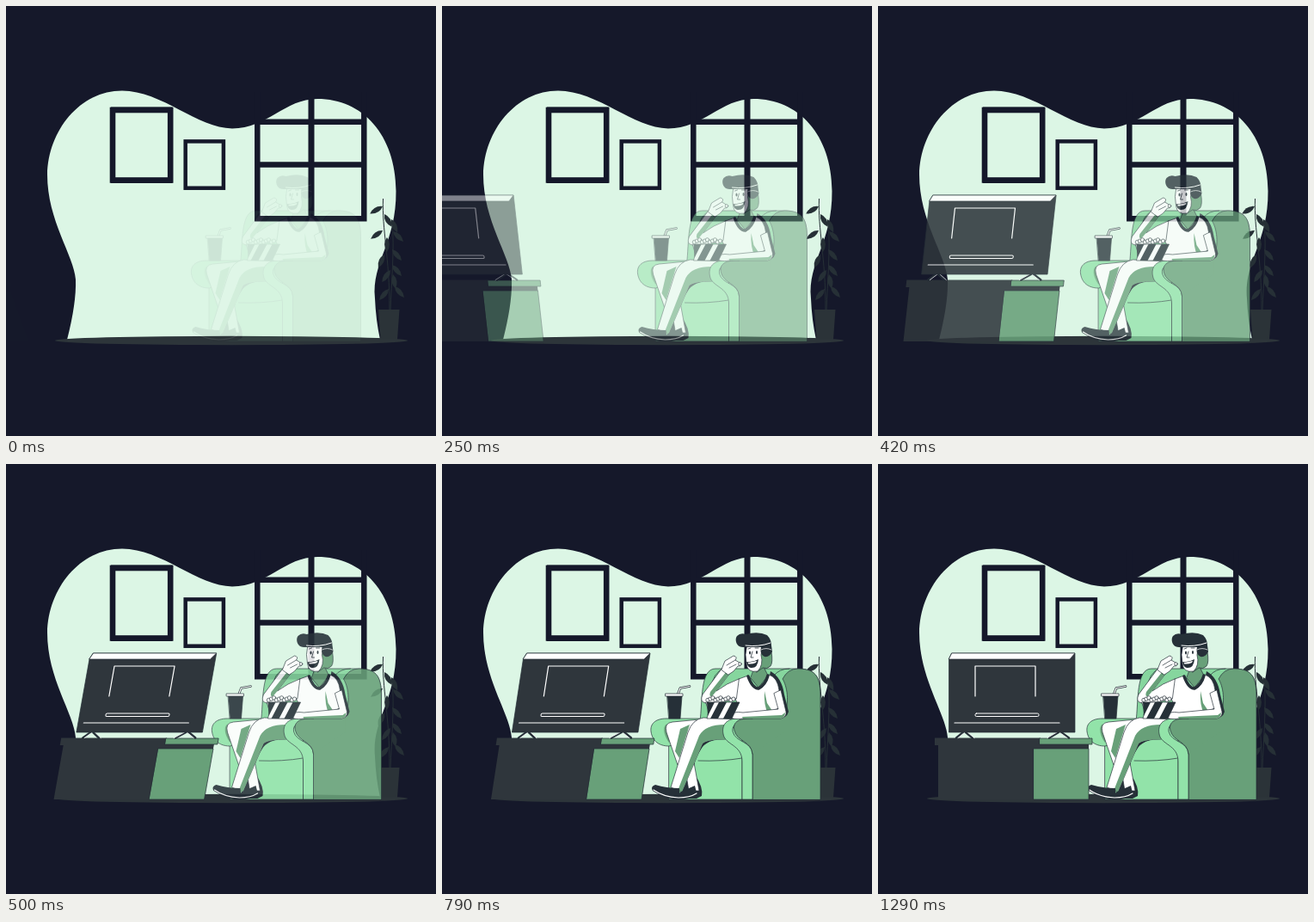
Write an HTML page that moves like this. It is 500 px wide and 500 px high and loops after 1330 ms.

```html
<!DOCTYPE html>
<html lang="en">
<head>
<meta charset="utf-8">
<title>Evening at home</title>
<style>
  html, body { margin: 0; width: 100%; height: 100%; overflow: hidden; background: #15182a; }
  svg { display: block; width: 100vw; height: 100vh; }
  .wall { fill: #dcf6e5; }
  .bars { fill: none; stroke: #15182a; }
  .ink { fill: #263038; }
  .light { fill: #92e3a9; }
  .mid { fill: #86d69e; }
  .deep { fill: #68a079; }
  .white { fill: #fff; }
  .line { fill: none; stroke: #263038; }
  .glow { fill: none; stroke: #fff; }
  #sitter, #tv { stroke-linejoin: round; stroke-linecap: round; }
  .outlined { stroke: #263038; stroke-width: .7; }
</style>
</head>
<body>
<svg viewBox="0 0 500 500">
  <path class="wall" d="M71 388Q82 345 81 318C79 290 48 250 48 196C49 145 86 98.600 135 98.600C181 98.600 223 142.400 263 142.400C304 142.400 324 108 362 108C415 108 453 150 453.500 215C454 276 425 297 429 340Q430 365 435 388Z"/>
  <g class="bars">
    <path stroke-width="6.5" d="M292.3 100V247.3H416.3V100M292 134.8H416M292 184.5H416"/>
    <path stroke-width="7" d="M355 100V247"/>
    <rect x="124" y="121" width="67.2" height="81.5" stroke-width="6.6"/>
    <path stroke-width="1.2" d="M122 118H193.5M122 205.5H193.5"/>
    <rect x="208.7" y="157.4" width="44.2" height="54.3" stroke-width="4.5"/>
  </g>
  <ellipse cx="262" cy="389" rx="205" ry="5.2" fill="#2d353a"/>
  <g fill="#263036">
    <path fill="none" stroke="#263036" d="M438.5 224C437 260 446 290 446 354M449 249C452 285 448 320 447 354"/>
    <g id="leaves"></g>
    <path fill="#2b3338" d="M433 353H457.5L455 388H435.5Z"/>
  </g>

  <g id="sitter">
    <!-- armchair -->
    <g class="outlined">
      <path class="mid" d="M300 300C303 275 300 238 318 238H412C437 238 440 250 440 272V390H300Z"/>
      <path class="deep" d="M361 390V330L397 296C405 276 401 258 396 250Q402 238 414 238C437 238 440 250 440 272V390Z"/>
      <path class="line" d="M312 264Q315 241 328 238M386 246Q392 238 404 238"/>
      <path class="light" d="M264 300H349V390H264Z"/>
      <path class="light" d="M300 296H261C247 296 242 303 243 311C245 325 256 328 264 328L300 318Z"/>
      <path class="deep" d="M263 302C256 303 257 314 264 324L270 304Z" stroke="none"/>
      <path class="line" d="M298 345Q325 346 349 342"/>
    </g>
    <path class="ink" d="M331 318Q306 321 301 332Q290 348 294 361Q304 376 302 386L296 389H276L284 345L303 318Z"/>

    <!-- drink -->
    <g class="outlined">
      <path class="line" stroke-width="2.6" d="M274.5 267L277 260.5L288 258.5"/>
      <path class="glow" stroke-width="1.2" d="M274.5 267L277 260.5L288 258.5"/>
      <path class="ink" d="M262 270H279L277 296H264Z"/>
      <path class="white" d="M260 267H280V270H260Z"/>
    </g>

    <!-- torso -->
    <path class="ink" d="M382 241Q395 248 398 268L403 288Q401 296 390 296L376 270Z"/>
    <g class="outlined">
      <path class="deep" d="M363 238L374 236L379 246L368 260L359 249Z"/>
      <path class="white" d="M345 250L356 246Q361 261 369 262Q377 257 380 245Q390 248 392 263L394 283L382 288L381 296H338L343 277L336 264Z"/>
      <path class="deep" stroke="none" d="M375 264Q374 281 379 290H386L378 278Z"/>
    </g>
    <path class="line" stroke-width="3.5" d="M356 247Q361 261 368 261Q376 257 379 246"/>

    <!-- raised arm -->
    <g class="outlined">
      <path class="white" d="M345 250Q331 255 319 264L335 243L326 237L303 268Q299 277 307 278Q326 278 342 273Z"/>
      <path class="deep" stroke="none" d="M319 264L335 243L331 241L312 265Q310 271 314 270Z"/>
      <path class="white" d="M325 239L329 229L339 223Q344 224 341 228L346 231Q350 235 344 235L339 241L333 245Z"/>
      <path class="line" d="M331 234L341 228M334 237L342 233"/>
    </g>

    <!-- legs -->
    <g class="outlined">
      <path class="white" d="M300 297L268 300Q258 301 261 312L274 350H282L287 380H299L292 342L302 310Z"/>
      <path class="deep" stroke="none" d="M277 308L288 303L276 342L271 334Z"/>
      <path class="white" d="M344 297L304 295Q291 297 286 312L266 376L279 381L303 325Q309 320 329 320Z"/>
      <path class="deep" stroke="none" d="M329 303Q306 303 299 316L274 380L279 381L303 325Q309 320 331 320Z"/>
    </g>
    <path class="light outlined" d="M347 296C330 295 325 304 327 314C329 327 349 326 349 346V390H361V337C360 322 341 324 338 311Q336 299 361 296Z"/>
    <path class="deep" d="M361 296C342 295 338 302 340 310C343 323 360 322 361 337L398 312V294Z"/>
    <path class="line" stroke-width=".7" d="M361 296C342 295 338 302 340 310C343 323 360 322 361 337"/>
    <path class="outlined white" d="M386 267L391 285L350 289Q338 287 334 293Q337 298 350 296L394 296Q401 294 400 288L394 263Z"/>
    <path class="deep" d="M349 294L395 292L399 289Q399 295 393 296H350Z"/>

    <!-- popcorn -->
    <path class="white outlined" d="M307 277H346L337 296H308L310 288Z"/>
    <path class="ink" d="M308 277H317L309 293ZM322 277H331L321 296H312ZM337 277H346L337 296H327Z"/>
    <g class="white outlined" id="popcorn"></g>

    <!-- shoes -->
    <path class="ink" d="M248 373Q261 377 276 377L277 388Q270 392 259 388L245 380Q242 375 248 373ZM278 381L294 374L297 386Q287 391 270 390Z"/>
    <path class="glow" stroke-width="1.2" d="M246 379Q257 387 275 388M275 388Q288 388 296 383"/>

    <!-- head -->
    <g class="outlined">
      <path class="deep" d="M369 215L383 218Q385 231 382 235Q378 239 373 237L366 242Z"/>
      <path class="white" d="M355 209H373L371 222Q374 234 367 241Q355 243 354 232L353 222Z"/>
    </g>
    <path class="ink" d="M354 230Q361 231 368 227Q367 238 359 237Q355 236 354 230Z"/>
    <path class="white" d="M356 231L366 229L365 231Q361 233 356 232.500Z"/>
    <ellipse class="ink" cx="358" cy="219.500" rx="1" ry="2"/>
    <ellipse class="ink" cx="366" cy="219" rx="1" ry="2"/>
    <path class="line" stroke-width=".8" d="M356 215L359 214M364 214L368 214M361 218L359 225L362 225"/>
    <path class="ink" d="M350 213C342 213 340 204 343 200Q347 196 353 198Q368 194 378 199Q383 204 383 211L384 218Q381 225 375 224Q369 221 371 213Z"/>
    <path class="glow" stroke-width="1" d="M353 211Q368 213 382 208"/>
    <path class="glow" stroke-width=".7" d="M371 216Q377 213 383 216"/>
    <circle class="white outlined" cx="346.500" cy="232.500" r="1.800"/>
  </g>

  <g id="tv">
    <g fill="#2f363c">
      <path d="M70 326H182V390H70ZM66 318.500H189V327H66ZM181 326H245V332H181Z"/>
      <path class="deep outlined" d="M181 331H245V390H181ZM188 319H249V326H188Z"/>
      <path class="line" stroke-width="2.500" d="M99 312L91 318.500M102 312L110 318.500M210 312L199 318.500M213 312L222 318.500"/>
      <path class="glow" stroke-width=".8" d="M101 312L93 318.500M104 312L112 318.500M208 312L197 318.500M211 312L220 318.500"/>
      <path class="outlined" d="M86 220H229V312H82.500V227Z"/>
    </g>
    <path class="white outlined" d="M86 220H229L223 227H82.500Z"/>
    <path class="glow" stroke-width="1.200" d="M113 270V235H183V270M89 301H211"/>
    <rect class="glow" x="113" y="290" width="74" height="3.500" rx="1.500"/>
  </g>
</svg>
<script>
const LOOP = 1330, STEPS = 32;
const TV_CENTER_Y = 305;
const $ = id => document.getElementById(id);

// Where each leaf joins its stem: x, y, rotation
const leaves = [
  [438, 233, 60], [440, 242, -30], [438, 261, 55], [450, 262, -45], [448, 248, -25],
  [440, 289, 25], [449, 283, -40], [443, 269, 0], [447, 307, 35], [449, 301, -40],
  [445, 329, 40], [452, 326, -40], [450, 312, -10]
];
$("leaves").innerHTML = leaves.map(([x, y, a]) =>
  `<path transform="translate(${x} ${y}) rotate(${a})" d="M0 0Q-6 8 0 17Q6 8 0 0"/>`).join("");
$("popcorn").innerHTML = Array.from({ length: 11 }, (_, i) =>
  `<circle cx="${309 + i * 3}" cy="${274.5 - i % 3 * 1.3}" r="2.2"/>`).join("");

const bezier = (a, b, s) => 3 * a * s * (1 - s) ** 2 + 3 * b * s * s * (1 - s) + s ** 3;

// cubic-bezier(.36, -.01, .5, 1.38)
function spring(x) {
  let lo = 0, hi = 1;
  for (let i = 0; i < 30; i++) {
    const mid = (lo + hi) / 2;
    if (bezier(.36, .5, mid) < x) lo = mid; else hi = mid;
  }
  return bezier(-.01, 1.38, lo);
}

const mix = (a, b, e) => a + (b - a) * e;

function tvPose(p) {
  if (p < .6) {
    const e = spring(p / .6);
    return { x: mix(-250, 0, e), skew: mix(20, -10, e), opacity: Math.min(1, e) };
  }
  if (p < .8) return { x: 0, skew: mix(-10, 2, spring((p - .6) / .2)), opacity: 1 };
  return { x: 0, skew: p < 1 ? mix(2, 0, spring((p - .8) / .2)) : 0, opacity: 1 };
}

function draw(now) {
  const step = Math.floor((now % LOOP + 4) / (LOOP / STEPS)) % STEPS;

  const slide = Math.min(0, 2 * step - 27.5);
  $("sitter").setAttribute("transform", `translate(${slide})`);
  $("sitter").setAttribute("opacity", 1 + slide / 30);

  const { x, skew, opacity } = tvPose((step + .77) / 31.15);
  $("tv").setAttribute("transform",
    `translate(${x} ${TV_CENTER_Y}) skewX(${skew}) translate(0 ${-TV_CENTER_Y})`);
  $("tv").setAttribute("opacity", Math.max(0, opacity));

  requestAnimationFrame(() => draw(performance.now()));
}
draw(0);
</script>
</body>
</html>
```
